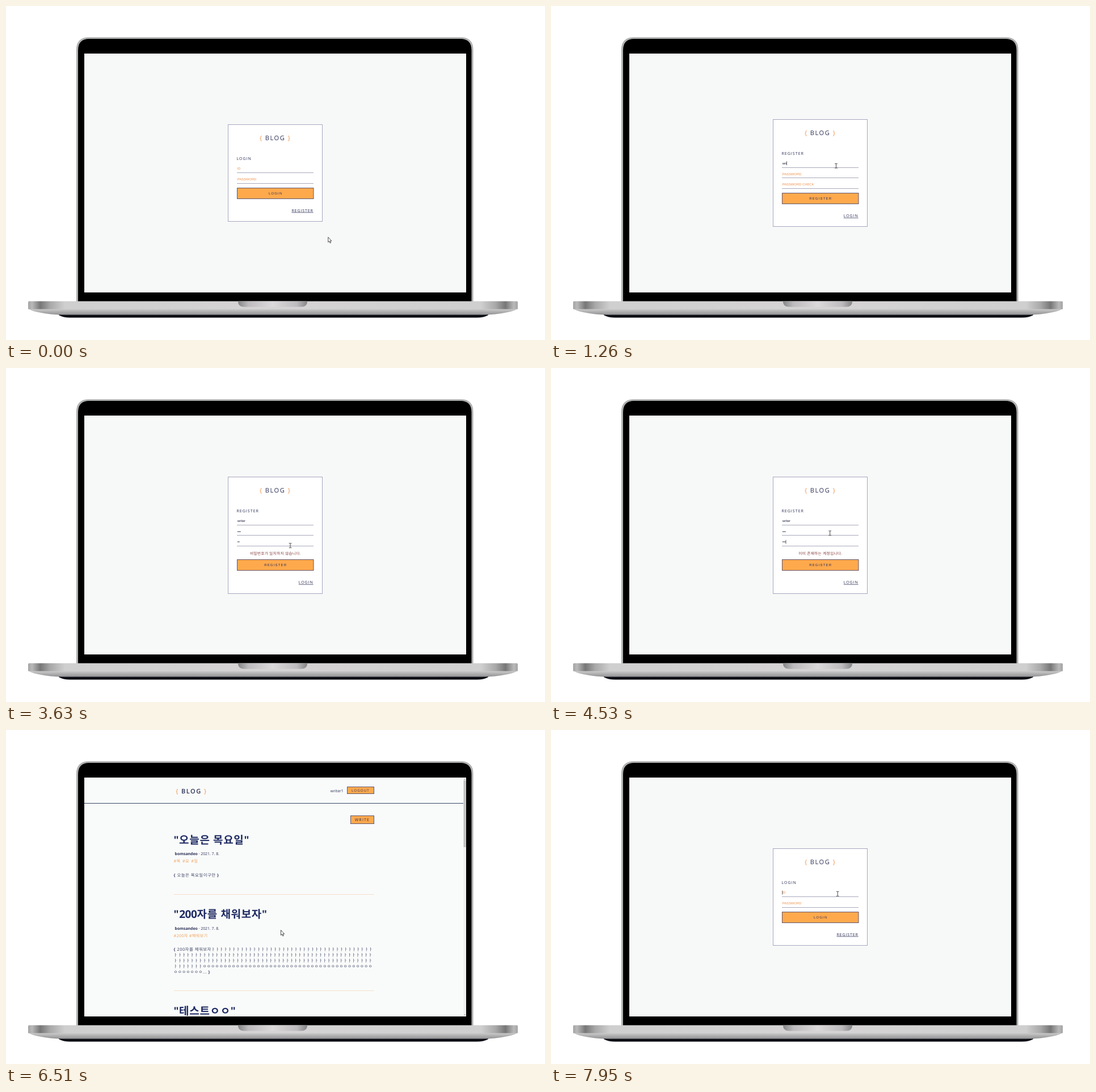
Write an HTML page that moves like this. It is 950 px wide and 590 px high and loops after 8 s.

```html
<!DOCTYPE html>
<html lang="ko">
<head>
<meta charset="utf-8">
<style>
html, body { margin: 0; width: 100%; height: 100%; overflow: hidden; background: #fff; }
svg { display: block; width: 950px; height: 590px; }
text { font-family: 'Open Sans', 'Noto Sans', 'Noto Sans CJK KR', sans-serif; fill: #2b2f55; text-rendering: geometricPrecision; white-space: pre; }
.brand { font-size: 11px; letter-spacing: 1.6px; }
.semi { font-weight: 600; }
.brace { font-size: 11px; fill: #f0914a; text-anchor: middle; }
.head { font-size: 7px; letter-spacing: 1.05px; }
.link { font-size: 7px; letter-spacing: .9px; text-decoration: underline; }
.input, .hint, .push { font-family: 'Liberation Sans', Arial, sans-serif; font-size: 5.85px; }
.input { fill: #1d1f3c; }
.hint { fill: #f0914a; }
.push { font-size: 6px; letter-spacing: 1.18px; }
.msg { font-size: 6.8px; letter-spacing: .2px; fill: #8a4040; text-anchor: middle; }
.btn { fill: #ffa94d; stroke: #62566c; }
.rule { stroke: #a9a9bb; }
.small { font-size: 6.9px; }
.bold { font-weight: 700; }
.title { font: 700 19px 'Noto Sans', 'Noto Sans CJK KR', sans-serif; letter-spacing: .65px; fill: #1f2b63; }
.num { letter-spacing: -.4px; }
.tag { font-size: 7.3px; fill: #f3a25c; letter-spacing: .2px; }
.body { font-family: 'Noto Sans', 'Noto Sans CJK KR', sans-serif; font-size: 7.4px; letter-spacing: .5px; fill: #414665; }
</style>
</head>
<body>
<svg viewBox="0 0 950 590">
  <defs>
    <linearGradient id="metal">
      <stop offset="0" stop-color="#a4a4a4"/><stop offset=".008" stop-color="#b9b9b9"/>
      <stop offset=".025" stop-color="#777"/><stop offset=".045" stop-color="#a8a8a8"/>
      <stop offset=".075" stop-color="#cfcfcf"/><stop offset=".5" stop-color="#d6d4d5"/>
      <stop offset=".925" stop-color="#cfcfcf"/><stop offset=".955" stop-color="#a8a8a8"/>
      <stop offset=".975" stop-color="#777"/><stop offset=".992" stop-color="#b9b9b9"/>
      <stop offset="1" stop-color="#a4a4a4"/>
    </linearGradient>
    <linearGradient id="under" x2="0" y2="1">
      <stop offset="0" stop-color="#d2d2d2"/><stop offset="1" stop-color="#929294"/>
    </linearGradient>
    <linearGradient id="notch">
      <stop offset="0" stop-color="#858587"/><stop offset=".15" stop-color="#bdbbbd"/>
      <stop offset=".5" stop-color="#dcd9db"/><stop offset=".85" stop-color="#bdbbbd"/>
      <stop offset="1" stop-color="#858587"/>
    </linearGradient>
    <clipPath id="view"><rect x="138" y="84" width="673" height="422"/></clipPath>
  </defs>
  <path d="M124.5 522V77Q124.5 55.800 146 55.800H801.500Q823 55.800 823 77V522Z" fill="#b5b7b6" stroke="#8c8e8d" stroke-width=".7"/>
  <path d="M127 522V78Q127 58 147 58H800.500Q820.500 58 820.500 78V522Z"/>
  <path d="M93 543H850V546Q842 550.500 830 550.500H113Q101 550.500 93 546Z" fill="#0b0d14"/>
  <path d="M39 534H902Q899 538 884 541Q862 545.500 840 545.500H101Q79 545.500 57 541Q42 538 39 534Z" fill="url(#under)"/>
  <path d="M39 523Q39 521.500 41 521.500H900Q902 521.500 902 523V535.500H39Z" fill="url(#metal)"/>
  <path d="M409 521.500H531Q531 531.500 520 531.500H420Q409 531.500 409 521.500Z" fill="url(#notch)"/>
  <rect x="138" y="84" width="673" height="422" fill="#f7f9f8"/>
  <g id="screen" clip-path="url(#view)"></g>
  <rect id="caret" width=".7" height="7" fill="#222"/>
  <g id="arrow"><path d="M.3 .3V9.300L2.300 7.500L3.700 10.800L5.100 10.200L3.700 7H6.400Z" fill="#fff" stroke="#222" stroke-width=".8"/></g>
  <g id="beam"><path d="M-2.300 -4H-.5L0 -3.500L.5 -4H2.300M0 -3.500V3.500M-2.300 4H-.5L0 3.500L.5 4H2.300" fill="none" stroke="#333" stroke-width=".9"/></g>
  <g id="hand"><path d="M-.8 0Q0 -.8 .8 0V3.600L4 4.200Q5.200 4.500 5 6L4.300 10H-.8L-3.200 6.300Q-3 5 -1.800 5.800L-.8 6.600Z" fill="#fff" stroke="#222" stroke-width=".8"/></g>
</svg>
<script>
const $ = id => document.getElementById(id);
const text = (cls, x, y, s, more = '') => `<text class="${cls}" x="${x}" y="${y}" ${more}>${s}</text>`;
const rect = (cls, x, y, w, h, more = '') => `<rect class="${cls}" x="${x}" y="${y}" width="${w}" height="${h}" ${more}/>`;
const line = (x1, x2, y, more) => `<path d="M${x1} ${y}H${x2}" ${more}/>`;
const snap = y => Math.floor(y) + .5;
const group = (id, s) => `<g id="${id}">${s}</g>`;
const brand = (x, y, cls = '') => text('brace', x - 25.3, y, '{') + text('brand ' + cls, x - 17.8, y, 'BLOG') + text('brace', x + 24.3, y, '}');

const cardTop = (n, msg) => 294.8 - (170.5 + (n - 2) * 18.8 + msg * 16.3) / 2;
const fieldY = (n, msg, i) => cardTop(n, msg) + 77.6 + i * 18.8;

function card(id, name, hints, linkText, linkX, msg) {
  const n = hints.length, top = cardTop(n, msg), end = top + (n - 2) * 18.8 + msg * 16.3;
  let s = rect('', 391.5, snap(top), 166, Math.round(end + 170.5 - top), 'fill="#fff" stroke="#a6a6be"');
  s += brand(474.5, top + 27.6) + text('head', 406.4, top + 62.8, name);
  hints.forEach((h, i) => {
    const y = fieldY(n, msg, i);
    s += text('hint', 407.7, y + 2.1, h, `id="${id}${i}" data-hint="${h}"`);
    s += line(407, 542, snap(y + 7.4), 'class="rule"');
  });
  if (msg) s += text('msg', 474.8, top + 137.8, '', 'id="note"');
  s += rect('btn', 407.5, snap(end + 111.5), 134.5, 19);
  s += text('push', 475.2, end + 123.3, name, 'text-anchor="middle"');
  s += text('link', linkX, end + 154, linkText);
  return group(id, s);
}

function post(y, title, day, tags, rows) {
  let s = text('title', 295.5, y + 6.7, `"${title.replace(/\d+/, '<tspan class="num">$&</tspan>')}"`);
  s += text('small', 297.6, y + 27, `<tspan class="bold">bomsandeo</tspan> · 2021. 7. ${day}.`);
  tags.forEach(([x, tag]) => s += text('tag', x, y + 40.2, tag));
  rows.forEach((row, i) => s += text('body', 295.6, y + 64.6 + i * 9.9, row));
  return s + line(296, 648.5, snap(y + 96.2 + Math.max(0, rows.length - 1) * 9.7), 'stroke="#f5dfca"');
}

const a = n => 'ㅏ'.repeat(n), o = n => 'ㅇ'.repeat(n);
const open = '<tspan class="bold">{</tspan> ', close = ' <tspan class="bold">}</tspan>';
const posts = y =>
  post(y, '오늘은 목요일', 8, [[295.5, '#목'], [311, '#요'], [326.3, '#일']], [open + '오늘은 목요일이구만' + close]) +
  post(y + 131.6, '200자를 채워보자', 8, [[295.5, '#200자'], [322.8, '#채워보기']],
    [open + '200자를 채워보자' + a(39), a(48), a(48), a(7) + o(41), o(7) + '...' + close]) +
  post(y + 302.3, '테스트ㅇㅇ', 7, [], []);

const button = (x, y, w, h, textX, s, size, ls) => rect('btn', x, y, w, h) +
  text('', textX, y + h / 2 + size * .36, s, `style="font-size:${size}px;letter-spacing:${ls}px"`);
const header = brand(326.7, 111.5, 'semi') + line(138, 806, 129.5, 'stroke="#3c4a63"');
const bar = rect('', 806, 84, 5, 422, 'fill="#f1f1f1"') + rect('', 806.5, 89, 4, 118, 'fill="#c1c1c1"') +
  '<path d="M807.300 87.500H809.700L808.500 86ZM807.300 502.500H809.700L808.500 504Z" fill="#777"/>';

$('screen').innerHTML =
  card('login', 'LOGIN', ['ID', 'PASSWORD'], 'REGISTER', 503.4, 0) +
  card('join', 'REGISTER', ['ID', 'PASSWORD', 'PASSWORD CHECK'], 'LOGIN', 515.8, 0) +
  card('retry', 'REGISTER', ['ID', 'PASSWORD', 'PASSWORD CHECK'], 'LOGIN', 515.8, 1) +
  group('blog', rect('', 138, 84, 673, 422, 'fill="#f9fbfa"') + header + group('list', bar) +
    group('member', text('small', 571.8, 110, 'writer1') + button(601.5, 100.5, 47, 12, 609.1, 'LOGOUT', 6.2, 1.1) +
      button(607.5, 151.5, 41, 14, 614.7, 'WRITE', 7, 1.2) + group('memberPosts', posts(194))) +
    group('guest', button(607.5, 99.5, 41, 14, 614.7, 'LOGIN', 7, 1) + posts(178.7)));

const LOOP = 8000;
const path = [
  [60, 567.5, 408], [390, 524, 360], [480, 524, 360], [870, 502.5, 282.3], [3360, 502.5, 282.3],
  [3480, 514, 371], [3660, 500, 309], [3930, 500, 309], [4200, 491.7, 291.7], [4950, 491.7, 291.7],
  [5130, 470, 271], [5280, 470, 271], [5550, 484.2, 353.2], [6510, 484.2, 353.2], [6750, 626, 106],
  [6930, 626, 106], [7200, 623.5, 131], [7380, 626, 107], [7440, 626, 107], [7740, 505.2, 289.3]
];
const shapes = [[0, 'arrow'], [360, 'hand'], [480, 'arrow'], [780, 'beam'], [3390, 'arrow'], [3600, 'beam'], [5310, 'arrow'],
  [5460, 'hand'], [6210, 'arrow'], [6720, 'hand'], [7020, 'arrow'], [7320, 'hand'], [7440, 'arrow'], [7710, 'beam']];
const pages = [[0, 'login'], [480, 'join'], [3210, 'retry'], [5940, 'blog'], [7440, 'login']];
const focus = [[870, 1590, 0], [1590, 2370, 1], [2520, 3060, 2], [3660, 4710, 2], [5130, 5460, 0], [7950, LOOP, 0]];
const keys = [
  ['writer1', [960, 1020, 1260, 1350, 1440, 1500, 5250]],
  ['•••', [1920, 1980, 2040]],
  ['•••', [2730, 2760, 4050]]
];
const last = (list, t) => list.filter(e => e[0] <= t).pop()[1];
const show = (id, on) => $(id).setAttribute('visibility', on ? 'inherit' : 'hidden');

function pointer(t) {
  const i = path.findIndex(p => p[0] > t);
  if (i === 0) return path[0].slice(1);
  if (i < 0) return path[path.length - 1].slice(1);
  const [t0, x0, y0] = path[i - 1], [t1, x1, y1] = path[i];
  const u = (t - t0) / (t1 - t0), e = u * u * (3 - 2 * u);
  return [x0 + (x1 - x0) * e, y0 + (y1 - y0) * e];
}

function fill(page, t) {
  keys.forEach(([word, times], i) => {
    const el = $(page + i);
    const value = word.slice(0, times.filter(k => k <= t).length);
    el.textContent = value || el.dataset.hint;
    el.setAttribute('class', value ? 'input' : 'hint');
    el.dataset.value = value;
  });
}

function draw(t) {
  const page = last(pages, t), form = page !== 'blog';
  for (const p of ['login', 'join', 'retry', 'blog']) show(p, p === page);
  if (page === 'join' || page === 'retry') fill(page, t);
  $('note').textContent = t < 4530 ? '비밀번호가 일치하지 않습니다.' : '이미 존재하는 계정입니다.';
  show('list', t >= 6030);
  show('memberPosts', t >= 6000);
  $('member').style.display = t < 6930 ? '' : 'none';
  $('guest').style.display = t < 6930 ? 'none' : '';
  if (!form) {
    show('list', t >= 6030);
    show('memberPosts', t >= 6000);
  } else {
    show('list', false);
    show('memberPosts', false);
  }

  const f = form && focus.find(([from, to]) => t >= from && t < to);
  show('caret', f);
  if (f) {
    const el = $(page + f[2]);
    const w = el.dataset.value ? el.getComputedTextLength() : 0;
    $('caret').setAttribute('x', 407.5 + w);
    $('caret').setAttribute('y', fieldY(page === 'login' ? 2 : 3, page === 'retry' ? 1 : 0, f[2]) - 3.5);
  }

  const kind = last(shapes, t), [x, y] = pointer(t);
  for (const k of ['arrow', 'beam', 'hand']) show(k, k === kind);
  $(kind).setAttribute('transform', `translate(${x} ${y})`);
}

const start = performance.now();
function tick() {
  draw(Math.floor((performance.now() - start) % LOOP / 30) * 30);
  requestAnimationFrame(tick);
}
tick();
</script>
</body>
</html>
```
